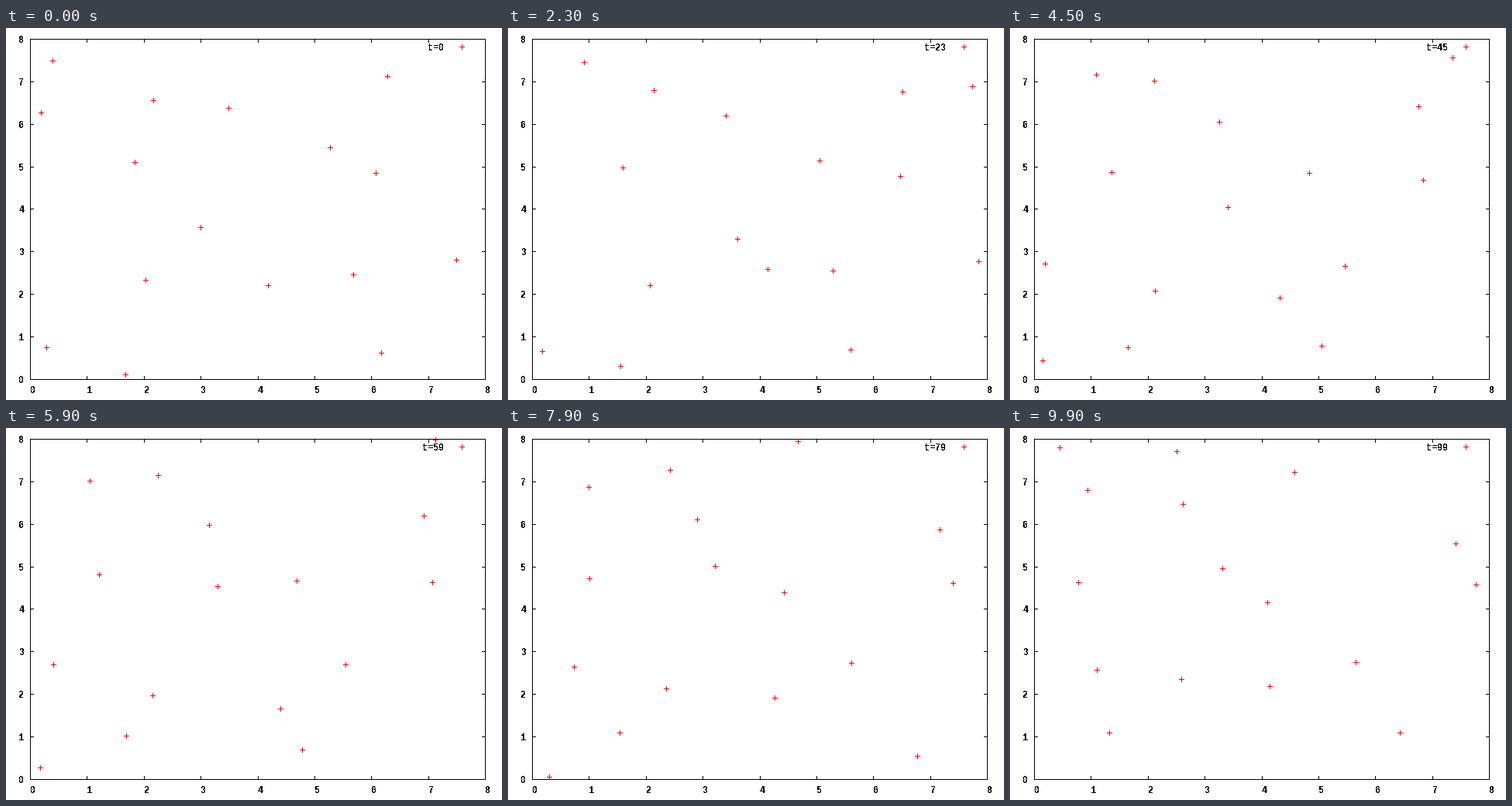
A matplotlib script that plays this animation: 640x480 px, repeating every 10000 ms.

```python
import matplotlib.pyplot as plt
import numpy as np
from matplotlib.animation import FuncAnimation
from matplotlib.collections import PolyCollection

W, H, DPI = 640, 480, 100
LEFT, RIGHT, TOP, BOTTOM = 31, 618, 14, 453
FRAMES = 100
RED = "#ff0000"

# Lennard-Jones gas in a periodic box, in reduced units
BOX = 8.0
DT = 0.01       # time per frame
SUBSTEPS = 4
MID = 45        # frame at which STATE holds

# x, y, vx, vy of every particle
STATE = np.array([
    [1.09, 7.16, 0.30, -1.09], [7.36, 7.56, -1.50, 3.19],
    [2.11, 7.02, 0.35, 0.95], [3.26, 6.05, -0.78, -0.60],
    [6.76, 6.41, 1.13, -1.59], [4.84, 4.85, -0.98, -1.31],
    [6.84, 4.68, 1.64, -0.36], [1.36, 4.87, -1.03, -0.47],
    [3.41, 4.05, -0.90, 3.46], [0.19, 2.72, 1.57, -0.22],
    [5.47, 2.66, 0.59, 0.35], [2.13, 2.08, 0.22, -0.67],
    [4.32, 1.91, 1.09, -3.04], [0.15, 0.44, 0.00, -1.18],
    [1.65, 0.75, 0.26, 1.93], [5.06, 0.78, -2.52, 0.46],
])


def acceleration(pos):
    gap = pos[:, None] - pos[None]
    gap -= BOX * np.round(gap / BOX)
    r2 = (gap ** 2).sum(axis=-1)
    np.fill_diagonal(r2, np.inf)
    pull = 24 * (2 / r2 ** 7 - 1 / r2 ** 4)
    return (pull[..., None] * gap).sum(axis=1)


def run(frames, direction):
    """Positions after each frame, by velocity Verlet in either time direction."""
    pos, vel = STATE[:, :2].copy(), STATE[:, 2:].copy()
    h = direction * DT / SUBSTEPS
    acc = acceleration(pos)
    path = []
    for _ in range(frames):
        for _ in range(SUBSTEPS):
            vel += acc * h / 2
            pos += vel * h
            acc = acceleration(pos)
            vel += acc * h / 2
        path.append(pos % BOX)
    return path


PATH = run(MID, -1)[::-1] + [STATE[:, :2]] + run(FRAMES - 1 - MID, 1)


def px(x):
    return LEFT + int((RIGHT - LEFT) * x / BOX + 0.5)


def py(y):
    return BOTTOM - int((BOTTOM - TOP) * y / BOX + 0.5)


def bar(x0, y0, x1, y1):
    """Pixel rectangle with both corners included."""
    return [(x0, y0), (x1 + 1, y0), (x1 + 1, y1 + 1), (x0, y1 + 1)]


def plus(x, y):
    return [bar(x - 3, y, x + 3, y), bar(x, y - 3, x, y + 3)]


def add_bars(bars, color):
    shapes = PolyCollection(bars, facecolors=color, edgecolors="none",
                            linewidths=0, antialiaseds=False)
    ax.add_collection(shapes, autolim=False)
    return shapes


def label(x, y, text, ha="center"):
    return ax.text(x, y, text, ha=ha, va="baseline", color="black",
                   family="Liberation Mono", weight="bold",
                   size=11.67 * 72 / DPI)


plt.rcParams["text.antialiased"] = False
fig = plt.figure(figsize=(W / DPI, H / DPI), dpi=DPI, facecolor="white")
ax = fig.add_axes([0, 0, 1, 1])
ax.set_xlim(0, W)
ax.set_ylim(H, 0)
ax.axis("off")

frame = [bar(LEFT, TOP, RIGHT, TOP), bar(LEFT, BOTTOM, RIGHT, BOTTOM),
         bar(LEFT, TOP, LEFT, BOTTOM), bar(RIGHT, TOP, RIGHT, BOTTOM)]
for n in range(9):
    x, y = px(n), py(n)
    frame += [bar(x, TOP, x, TOP + 4), bar(x, BOTTOM - 4, x, BOTTOM),
              bar(LEFT, y, LEFT + 4, y), bar(RIGHT - 4, y, RIGHT, y)]
    label(x + 3.5, 471, str(n))
    label(20, y + 5, str(n))
add_bars(frame, "black")
add_bars(plus(588, 24), RED)

points = add_bars([], RED)
clock = label(565, 29, "t=0", ha="right")


def update(t):
    points.set_verts([b for x, y in PATH[t] for b in plus(px(x), py(y))])
    clock.set_text(f"t={t}")
    return points, clock


anim = FuncAnimation(fig, update, frames=FRAMES, interval=100,
                     repeat=True, repeat_delay=0, blit=False)
plt.show()
```
